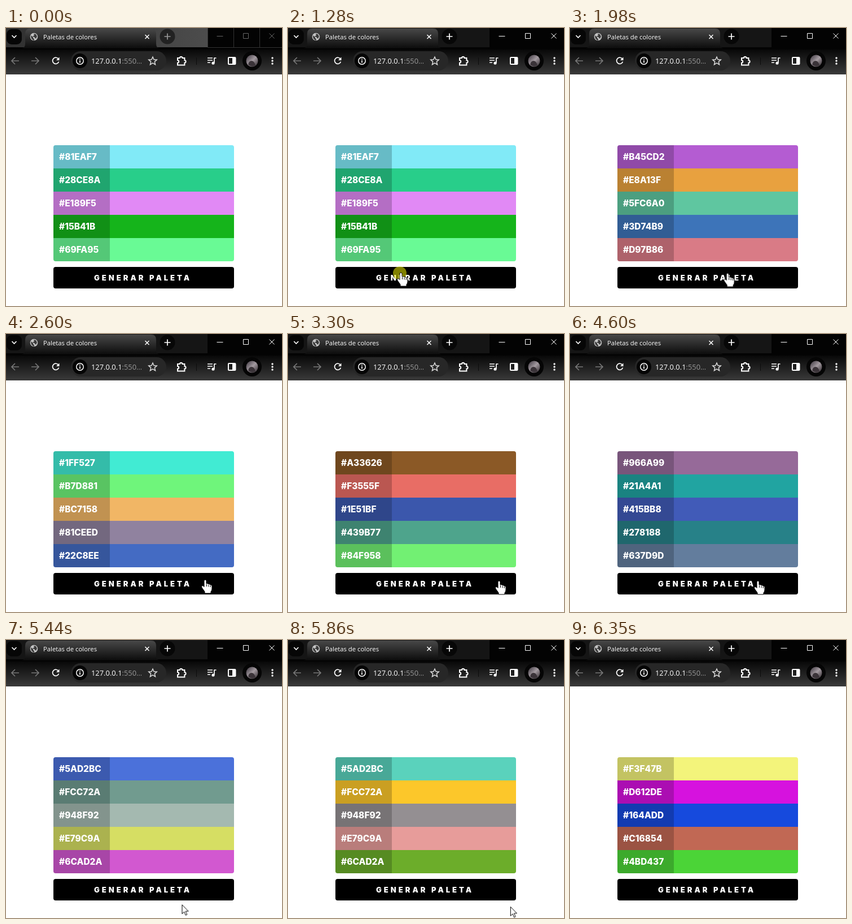
Write an HTML page that moves like this. It is 489x491 px and loops after 6.68 s.

```html
<!DOCTYPE html>
<html lang="es">
<head>
<meta charset="utf-8">
<title>Paletas de colores</title>
<style>
  html, body { margin: 0; width: 100%; height: 100%; overflow: hidden; background: #fff; }
  svg { display: block; }
  .ui { font-family: "Open Sans", "Noto Sans", sans-serif; fill: #fff; }
  .label { font: 800 15.5px Inter, sans-serif; fill: #fff; }
  .cta { font: 900 13px Inter, sans-serif; letter-spacing: 4px; fill: #fff; }
  .line { fill: none; stroke: #fff; stroke-width: 1.7; }
  .thin { stroke-width: 1.5; }

  .blurred, .focused, .press, .cursor, .arrow, .hand { animation: 6680ms step-end infinite; }
  .blurred { animation-name: blurred; }
  .focused { animation-name: focused; }
  .press { animation-name: press; }
  .arrow { animation-name: arrow; }
  .hand { animation-name: hand; }
  .cursor { animation-name: travel; animation-timing-function: linear; }

  @keyframes blurred { 0% { opacity: 1 } 19.1%, 100% { opacity: 0 } }
  @keyframes focused { 0% { opacity: 0 } 19.1%, 100% { opacity: 1 } }
  @keyframes press { 0% { opacity: 0 } 19.1% { opacity: 1 } 21.4%, 100% { opacity: 0 } }
  @keyframes arrow {
    0% { opacity: 0 } 1.94% { opacity: 1 } 3.88% { opacity: 0 }
    8.8% { opacity: 1 } 12.1% { opacity: 0 } 75.1% { opacity: 1 } 95%, 100% { opacity: 0 }
  }
  @keyframes hand { 0% { opacity: 0 } 12.1% { opacity: 1 } 75.1%, 100% { opacity: 0 } }
  @keyframes travel {
    0% { transform: translate(367px, 464px); animation-timing-function: step-end }
    2.9% { transform: translate(88px, 372px); animation-timing-function: step-end }
    8.8% { transform: translate(0px, 391px) }
    11% { transform: translate(78px, 415px) }
    13% { transform: translate(160px, 439px); animation-timing-function: ease-out }
    15.2%, 22% { transform: translate(200px, 432px); animation-timing-function: ease-in-out }
    37%, 40% { transform: translate(353px, 434px); animation-timing-function: ease-in-out }
    48.5%, 60% { transform: translate(374px, 436px); animation-timing-function: ease-in-out }
    68%, 70% { transform: translate(333px, 436px) }
    73.4% { transform: translate(378px, 440px) }
    75.6% { transform: translate(374px, 462px) }
    77.6% { transform: translate(340px, 466px) }
    79.7% { transform: translate(285px, 478px) }
    81.4% { transform: translate(311px, 467px) }
    85.3% { transform: translate(345px, 474px) }
    88.3% { transform: translate(405px, 470px) }
    91.3% { transform: translate(375px, 480px) }
    95%, 100% { transform: translate(330px, 495px) }
  }
</style>
</head>
<body>
<svg width="489" height="491" viewBox="0 0 489 491">
  <defs>
    <linearGradient id="bar" x2="0" y2="1">
      <stop stop-color="#080808"/><stop offset="1" stop-color="#3a3a3a"/>
    </linearGradient>
    <linearGradient id="tab" x2="0" y2="1">
      <stop stop-color="#484848"/><stop offset="1" stop-color="#0c0c0c"/>
    </linearGradient>
    <linearGradient id="strip" x2="1" y2="0">
      <stop stop-color="#303030"/><stop offset="1" stop-color="#4c4c4c"/>
    </linearGradient>
    <linearGradient id="photo" x2="1" y2="1">
      <stop stop-color="#3a343c"/><stop offset=".5" stop-color="#a39aa0"/><stop offset="1" stop-color="#2c262a"/>
    </linearGradient>
    <clipPath id="card"><rect x="84" y="207" width="320" height="205" rx="4"/></clipPath>
  </defs>

  <!-- Title bar -->
  <rect width="489" height="82" fill="#030303"/>
  <g class="blurred">
    <rect width="357" height="34" fill="url(#strip)"/>
    <path d="M357.5 0V34.5H489M403.5 0V34M449.5 0V34" fill="none" stroke="#333"/>
    <circle cx="286" cy="15" r="13.5" fill="#222"/>
    <path d="M280.5 15h11M286 9.5v11" class="line" style="stroke:#999"/>
    <path d="M373.5 14.5h11M420.5 9.5h9v9h-9zM466.5 9.5l9 9m0-9l-9 9" fill="none" stroke="#666"/>
  </g>
  <g class="focused">
    <rect width="357" height="34" fill="#151515"/>
    <circle cx="286" cy="15" r="13.5" fill="#070707"/>
    <path d="M280.5 15h11M286 9.5v11" class="line"/>
    <path d="M373.5 14.5h11M420.5 9.5h9v9h-9zM466.5 9.5l9 9m0-9l-9 9" fill="none" stroke="#fff"/>
  </g>
  <rect x="1" y="2" width="27" height="27" rx="9" fill="#060606"/>
  <path d="M10.5 13l4 4 4-4" class="line"/>
  <path d="M26 36q8 0 8-8V10q0-9 9-9H257q9 0 9 9V28q0 8 8 8z" fill="url(#tab)"/>
  <circle cx="49.5" cy="15.5" r="6.8" fill="#c4c4c4"/>
  <path d="M44 13l4 3v2l2 1v3q-6-1-6-9zM49 10l4 1 2 4-2 4-3-3-3-1 3-2z" fill="#3a3a3a"/>
  <text class="ui" x="66" y="20" font-size="11.3">Paletas de colores</text>
  <path d="M246.5 12l7 7m0-7l-7 7" class="line thin"/>

  <!-- Toolbar -->
  <rect y="38" width="489" height="44" fill="url(#bar)"/>
  <g class="line" style="stroke:#777">
    <path d="M23 58H10m6-6l-6 6 6 6"/>
    <path d="M45 58h13m-6-6l6 6-6 6"/>
  </g>
  <path d="M93 55a5.6 5.6 0 1 0 .5 4.5" class="line"/>
  <path d="M94.5 51.5v5.500h-5.500z" fill="#fff"/>
  <rect x="115" y="41" width="169" height="34" rx="17" fill="#272727"/>
  <circle cx="131" cy="58" r="13" fill="#050505"/>
  <circle cx="131" cy="58" r="6.2" class="line thin"/>
  <path d="M131 57v4.5M131 54v1.7" class="line"/>
  <text class="ui" x="151" y="63" font-size="12.9">127.0.0.1<tspan fill="#999">:550…</tspan></text>
  <path d="M260 51l2.1 4.7 5.1.5-3.9 3.4 1.2 5-4.5-2.7-4.5 2.7 1.2-5-3.9-3.4 5.1-.5z" class="line thin" style="stroke:#ddd"/>
  <path d="M304 53h4a2.2 2.2 0 0 1 4.4 0h4v4a2.2 2.2 0 0 1 0 4.4v4h-12.4v-4a2.2 2.2 0 0 0 0-4.4z" class="line" style="stroke-width:2"/>
  <path d="M337.5 52v13" stroke="#0c0c0c"/>
  <path d="M357 53h9M357 57h9M357 61h5M369 52.5v9M368.5 53h4" class="line"/>
  <circle cx="367" cy="62" r="2.6" fill="#fff"/>
  <rect x="394" y="52" width="12.5" height="12" rx="1" class="line" style="stroke-width:2"/>
  <path d="M401 52h6v12h-6z" fill="#fff"/>
  <circle cx="436" cy="58" r="17" fill="#050505"/>
  <circle cx="436" cy="58" r="10.5" fill="url(#photo)"/>
  <path d="M429 65q1-7 6-7t7 8q-6 4-13-1z" fill="#3a3338"/>
  <g fill="#fff">
    <circle cx="472" cy="53" r="1.7"/><circle cx="472" cy="58" r="1.7"/><circle cx="472" cy="63" r="1.7"/>
  </g>

  <!-- Page -->
  <rect y="82" width="489" height="409" fill="#fff"/>
  <g id="rows" clip-path="url(#card)"></g>
  <rect x="84" y="422" width="320" height="38" rx="4"/>
  <text class="cta" x="156" y="446">GENERAR PALETA</text>

  <circle class="press" cx="198" cy="433" r="12" fill="#ff0" fill-opacity=".5"/>
  <g class="cursor">
    <path class="arrow" d="M.5.5V16.5l3.7-3.500 2.6 6 2.5-1.1-2.6-5.900h5z" fill="#fff" stroke="#000"/>
    <g class="hand" stroke="#000">
      <path d="M-2 2q0-2 2-2t2 2V7q3-1 4 1 2-1 3 1 3-.5 3 2v5q0 3-2 5v3H-1v-3l-5-7q-1.5-3 1-3.500 1.5 0 3 2z" fill="#fff"/>
      <path d="M2.5 8v4M6 9v3.500M9.300 10v3"/>
    </g>
  </g>
</svg>

<script>
  const LOOP = 6680, FIRST = 1434, GAP = 568, FADE = 315;
  const palettes = [
    "81EAF7 28CE8A E189F5 15B41B 69FA95",
    "B45CD2 E8A13F 5FC6A0 3D74B9 D97B86",
    "45EAE4 68F87A F6BD66 917A97 4861BF",
    "1FF527 B7D881 BC7158 81CEED 22C8EE",
    "A33626 F3555F 1E51BF 439B77 84F958",
    "C78E4A 6D49C2 89B36E D06A95 3FA7C4",
    "966A99 21A4A1 415BB8 278188 637D9D",
    "4967DD 639699 A6BDB3 D4E55D DC4FE1",
    "5AD2BC FCC72A 948F92 E79C9A 6CAD2A",
    "F3F47B D612DE 164ADD C16854 4BD437"
  ].map(p => p.split(" "));

  function make(tag, attrs) {
    const el = document.createElementNS("http://www.w3.org/2000/svg", tag);
    for (const key in attrs) el.setAttribute(key, attrs[key]);
    return document.getElementById("rows").appendChild(el);
  }

  const rows = palettes[0].map((_, i) => {
    const y = 207 + 41 * i;
    const bar = make("rect", { x: 84, y, width: 320, height: 41 });
    make("rect", { x: 84, y, width: 100, height: 41, "fill-opacity": .2 });
    return { bar, label: make("text", { x: 94, y: y + 26, class: "label" }) };
  });

  // The CSS "ease" curve: cubic-bezier(.25, .1, .25, 1)
  function ease(x) {
    const curve = (u, a, b) => 3 * u * (1 - u) * ((1 - u) * a + u * b) + u ** 3;
    let low = 0, high = 1;
    for (let i = 0; i < 16; i++) {
      const mid = (low + high) / 2;
      if (curve(mid, .25, .25) < x) low = mid; else high = mid;
    }
    return curve(low, .1, 1);
  }

  const rgb = hex => [0, 2, 4].map(i => parseInt(hex.slice(i, i + 2), 16));

  function mix(from, to, k) {
    const end = rgb(to);
    return `rgb(${rgb(from).map((c, i) => Math.round(c + (end[i] - c) * k))})`;
  }

  function draw(t) {
    const step = Math.floor((t - FIRST) / GAP) + 1;
    const n = Math.max(0, Math.min(palettes.length - 1, step));
    const k = n ? ease(Math.min(1, (t - FIRST - (n - 1) * GAP) / FADE)) : 1;
    const now = palettes[n], before = palettes[Math.max(0, n - 1)];
    rows.forEach(({ bar, label }, i) => {
      bar.setAttribute("fill", mix(before[i], now[i], k));
      label.textContent = "#" + now[i];
    });
  }

  const start = performance.now();
  function tick() {
    draw((performance.now() - start) % LOOP);
    requestAnimationFrame(tick);
  }
  tick();
</script>
</body>
</html>
```
